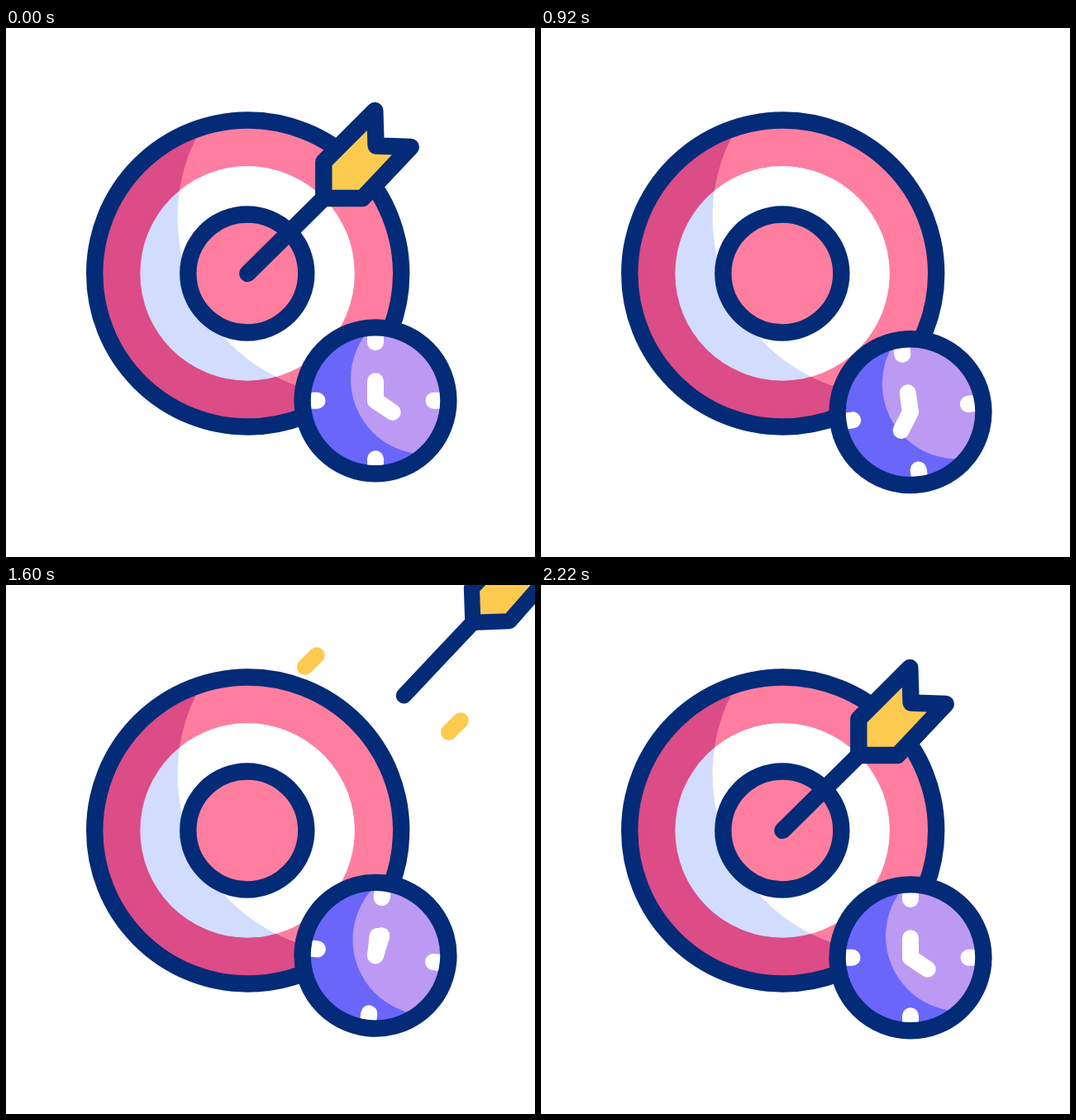
An HTML page for the animation above (2.4 s loop, 640 by 640 pixels).

```html
<!DOCTYPE html>
<html lang="en">
<head>
<meta charset="utf-8">
<title>Target and clock</title>
<style>
  html, body { margin: 0; width: 100%; height: 100%; overflow: hidden; background: #fff; }
  svg { display: block; width: 100%; height: 100%; }
  .line { fill: none; stroke: #032b77; stroke-width: 20.4; stroke-linecap: round; stroke-linejoin: round; }
  .white { fill: none; stroke: #fff; stroke-width: 20; stroke-linecap: round; }
  .spark { stroke: #fdca50; stroke-width: 19.5; stroke-linecap: round; }
</style>
</head>
<body>
<svg viewBox="0 0 640 640">
  <defs>
    <clipPath id="disc"><circle cx="292.3" cy="297" r="185"/></clipPath>
    <clipPath id="band"><circle cx="292" cy="297" r="129.7"/></clipPath>
    <clipPath id="face"><circle r="88"/></clipPath>
  </defs>
  <g id="target">
    <circle cx="292.3" cy="297" r="185" fill="#dc4c86"/>
    <circle cx="423.5" cy="229" r="216" fill="#ff7ea0" clip-path="url(#disc)"/>
    <circle cx="292" cy="297" r="129.7" fill="#d2dcfd"/>
    <circle cx="423.5" cy="229" r="216" fill="#fff" clip-path="url(#band)"/>
    <circle class="line" cx="292.7" cy="297" r="185.5"/>
    <circle class="line" cx="291.8" cy="297" r="71.5" style="fill:#ff7ea0"/>
  </g>
  <g id="sparks"></g>
  <g id="arrow">
    <path class="line" d="M0 0 92-91"/>
    <path class="line" d="M92-91V-135L154-197 155.3-154.5 197.5-153 139-91Z" style="fill:#fdca50"/>
  </g>
  <g id="clock">
    <circle r="88" fill="#6a66fa"/>
    <circle cx="61" cy="-26" r="91" fill="#bc9af3" clip-path="url(#face)"/>
    <path class="white" d="M0-86V-70.5M0 86V70.5M-86 0H-70.5M86 0H70.5"/>
    <path class="white" d="M0 0V-23.5"/>
    <path class="white" id="hand" d="M0 0V-25"/>
    <circle class="line" r="88.4"/>
  </g>
</svg>
<script>
const LOOP = 2400, START = 220, END = 2220;
const PULL = 580, GONE = 820, ENTER = 1400, HIT = 1800;
const $ = id => document.getElementById(id);
const clamp = x => Math.min(1, Math.max(0, x));
const ramp = (t, a, b) => clamp((t - a) / (b - a));
const smooth = u => u * u * (3 - 2 * u);

// Eased value along [time, value] keys
function track(t, keys) {
  let value = keys[0][1];
  for (let i = 1; i < keys.length; i++) {
    const [a, from] = keys[i - 1], [b, to] = keys[i];
    if (t >= a) value = from + (to - from) * smooth(ramp(t, a, b));
  }
  return value;
}

const swingKeys = [[START, 0], [340, 5.8], [460, -5.5], [PULL, 0], [HIT, 0],
  [1900, -8.5], [2010, 6], [2120, -3], [END, 0]];
const bobKeys = [[START, 0], [630, -15.8], [1025, 20], [1440, -15], [1835, 19.3], [END, 0]];
const tiltKeys = [[START, 0], [410, -7.9], [1220, -7.9], [1820, 12.5], [END, 0]];

// Each spark is drawn by its head and erased by its tail
const streak = { head: [1454, 1903], tail: [1810, 2130] };
const splash = { head: [1770, 1885], tail: [1840, 1970] };
const sparks = [
  { x: 376, y: 85, dx: -57, dy: 56, ...streak },
  { x: 550, y: 164, dx: -57, dy: 56, ...streak },
  { x: 262, y: 306.5, dx: -34, dy: -1, ...splash },
  { x: 284, y: 331, dx: -12, dy: 29, ...splash }
].map(s => {
  const el = document.createElementNS("http://www.w3.org/2000/svg", "line");
  el.setAttribute("class", "spark");
  $("sparks").append(el);
  return { ...s, el };
});

function drawSpark({ el, x, y, dx, dy, head, tail }, t) {
  const h = smooth(ramp(t, ...head)), k = smooth(ramp(t, ...tail));
  const ends = { x1: x + dx * k, y1: y + dy * k, x2: x + dx * h, y2: y + dy * h };
  for (const name in ends) el.setAttribute(name, ends[name]);
  el.style.display = h > k ? "" : "none";
}

function arrowPose(t, swing) {
  if (t >= PULL && t < ENTER) {
    const u = (t - PULL) / 220;
    return { x: -170 * u ** 1.8, y: -387 * u ** 1.5, angle: -62 * u, scale: 1 - 0.25 * u };
  }
  if (t >= ENTER && t < HIT) {
    const r = (HIT - t) / 200;
    return { x: 190 * r, y: -164 * r, angle: -2 * r, scale: 1 - 0.06 * r };
  }
  return { x: 0, y: 0, angle: 0.83 * swing, scale: 1 };
}

function draw(t) {
  const set = (id, transform) => $(id).setAttribute("transform", transform);
  const swing = track(t, swingKeys);
  set("target", `rotate(${-swing / 196 * 180 / Math.PI} 292.5 101)`);

  const a = arrowPose(t, swing);
  set("arrow", `translate(${292.3 + a.x} ${297 + a.y}) rotate(${a.angle}) scale(${a.scale})`);
  $("arrow").style.display = t > GONE && t < ENTER ? "none" : "";

  set("clock", `translate(447 ${450.8 + track(t, bobKeys)}) rotate(${track(t, tiltKeys)})`);
  const u = ramp(t, START, END);
  set("hand", `rotate(${124 + 360 * u * (0.15 + 2.05 * u - 1.2 * u * u)})`);

  sparks.forEach(s => drawSpark(s, t));
}

const begin = performance.now();
function frame(now) {
  draw(Math.max(0, now - begin) % LOOP);
  requestAnimationFrame(frame);
}
draw(0);
requestAnimationFrame(frame);
</script>
</body>
</html>
```
